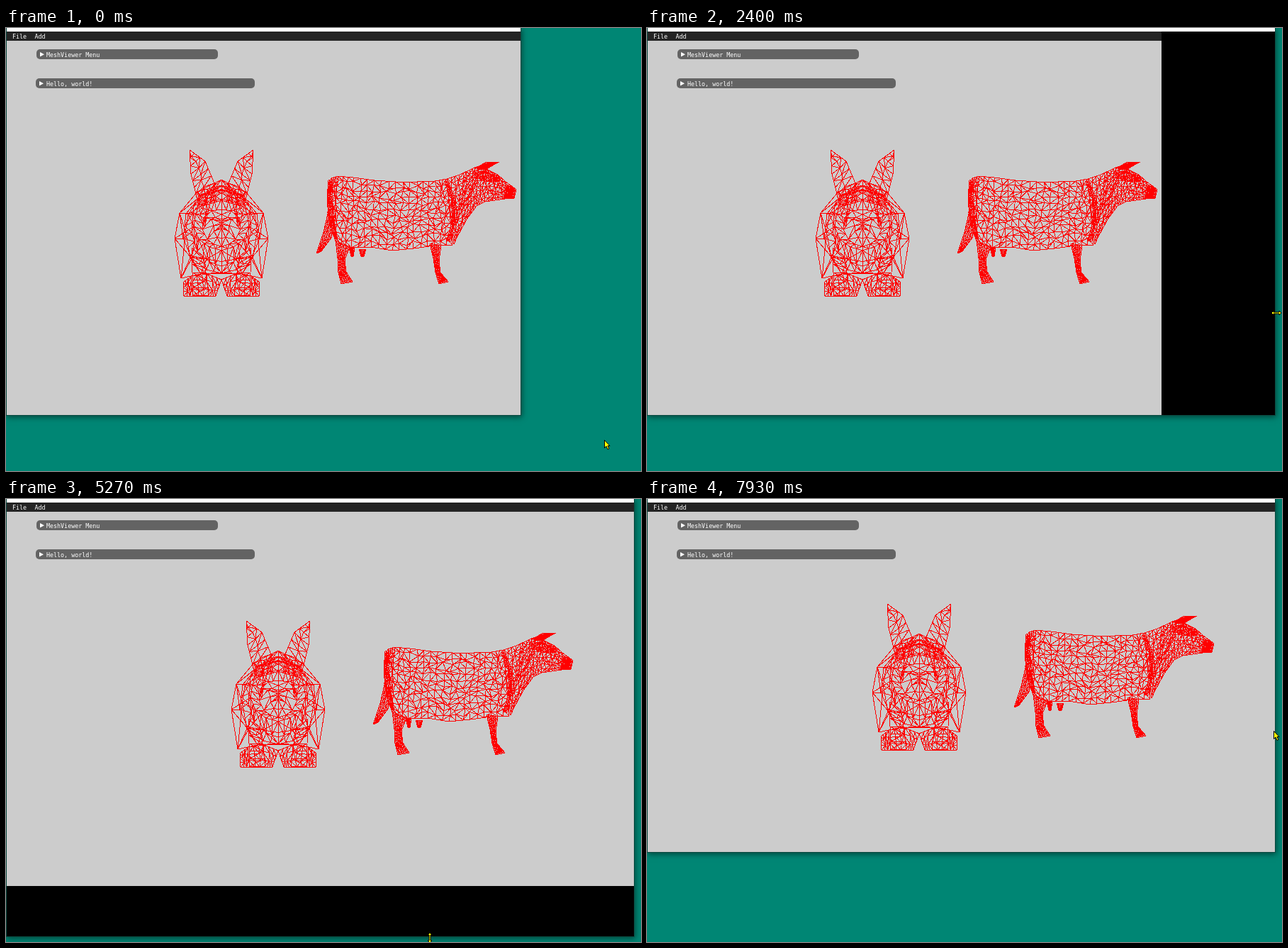
These frames come from a looping animation (896x625 px, 8 s). An HTML page:

```html
<!DOCTYPE html>
<html lang="en">
<head>
<meta charset="utf-8">
<title>Mesh viewer resize</title>
<style>
  html, body { margin: 0; width: 100%; height: 100%; overflow: hidden; background: #008674; }
  body { position: relative; }
  div, svg { position: absolute; }
  #win { left: 1px; top: 0; background: #000; box-shadow: 0 0 0 1px #0b4a41, 1px 2px 8px 1px rgba(0,0,0,.5); overflow: hidden; }
  #title { left: 0; top: 0; width: 100%; height: 5px; background: #fff; }
  #view { left: 0; top: 5px; background: #ccc; overflow: hidden; }
  #menu { left: 0; top: 0; width: 100%; height: 13px; background: #242424; }
  svg { left: 0; top: 0; width: 896px; height: 625px; }
  text { font: 8.35px "DejaVu Sans Mono", monospace; fill: #fff; }
  .panel { fill: #636363; }
  #mesh { fill: none; stroke: #f00; stroke-width: 1; shape-rendering: crispEdges; }
  #cursor path { fill: #ff0; stroke: #000; stroke-width: 1; }
</style>
</head>
<body>
<div id="win">
  <div id="title"></div>
  <div id="view">
    <div id="menu"></div>
    <svg viewBox="1 5 896 625">
      <path id="mesh"/>
      <rect class="panel" x="43" y="30" width="256" height="14" rx="5"/>
      <rect class="panel" x="42" y="71" width="309" height="14" rx="5"/>
      <path d="M48 34L54 37.2L48 40.5ZM47 75L53 78.2L47 81.500Z" fill="#fff"/>
      <text x="9" y="15">File</text>
      <text x="40.500" y="15">Add</text>
      <text x="57" y="40.500">MeshViewer Menu</text>
      <text x="57" y="81.500">Hello, world!</text>
    </svg>
  </div>
</div>
<svg viewBox="0 0 896 625"><g id="cursor"><path/></g></svg>

<script>
const $ = id => document.getElementById(id);
const mix = (a, b, u) => a + (b - a) * u;

let seed = 7;
const random = () => (seed = seed * 16807 % 2147483647) / 2147483647;

// ---- wireframes: each patch is a grid stretched between two polylines ----
const parse = s => s.split('|').map(p => p.trim().split(' ').map(Number));

function along(line, u) {
  const k = u * (line.length - 1), i = Math.min(Math.floor(k), line.length - 2);
  return [0, 1].map(c => mix(line[i][c], line[i + 1][c], k - i));
}

let path = '';
function patch(from, to, cols, rows, { wobble = 0, mirror = false } = {}) {
  const a = parse(from), b = parse(to), grid = [];
  for (let i = 0; i <= cols; i++) {
    const p = along(a, i / cols), q = along(b, i / cols);
    grid.push(Array.from({ length: rows + 1 }, (_, j) => {
      const inner = i && j && i < cols && j < rows ? wobble : 0;
      return [0, 1].map(c => mix(p[c], q[c], j / rows) + (random() - .5) * inner);
    }));
  }
  const line = (p, q) => {
    const add = f => path += `M${f(p[0])} ${p[1].toFixed(1)}L${f(q[0])} ${q[1].toFixed(1)}`;
    add(x => x.toFixed(1));
    if (mirror) add(x => (608 - x).toFixed(1));
  };
  for (let i = 0; i <= cols; i++) for (let j = 0; j <= rows; j++) {
    if (i < cols) line(grid[i][j], grid[i + 1][j]);
    if (j < rows) line(grid[i][j], grid[i][j + 1]);
    if (i < cols && j < rows) {
      if (random() < .5) line(grid[i][j], grid[i + 1][j + 1]);
      else line(grid[i + 1][j], grid[i][j + 1]);
    }
  }
}

function bunny() {
  const half = { mirror: true, wobble: 5 };
  const rings = [
    '304 214|270 231|245 261|238 297|247 353|275 347|304 345',
    '304 222|274 238|254 262|250 297|262 325|283 341|304 346',
    '304 228|280 238|264 260|262 288|270 315|287 330|304 336',
    '304 241|284 246|268 262|265 280|272 298|287 309|304 314',
    '304 256|290 258|279 268|277 284|284 298|293 305|304 308'
  ];
  for (let i = 0; i < 4; i++) patch(rings[i], rings[i + 1], i ? 12 : 6, 1, half);
  patch(rings[4], '304 270|304 285', 6, 2, half);
  patch(rings[0], rings[3], 6, 2, half);
  patch('304 214|270 231', '304 243|274 252', 4, 3, half);
  patch('259 172|261 206|268 234|278 278', '259 172|281 188|294 219|281 278', 9, 2, half);
  patch('262 310|263 345|264 377', '278 325|282 345|286 377', 6, 1, half);
  patch('250 359|262 350|284 347|304 355', '251 378|264 378|285 378|296 378', 9, 3, half);
}

function cow() {
  // body, neck, head
  patch('454 224|459 212|468 209|490 211|520 215|550 217|580 217|605 216|622 213',
        '455 262|459 285|466 303|487 310|515 309|545 314|575 311|605 307|630 306', 24, 12, { wobble: 6 });
  patch('622 213|640 207|655 200|666 195', '632 305|637 294|650 270|664 251', 9, 12, { wobble: 3 });
  patch('666 195|680 200|694 207|704 216|720 228', '664 251|676 245|690 243|704 241|717 240', 12, 8, { wobble: 3 });
  // horn, ear, muzzle
  patch('664 197|676 190|696 189', '668 200|680 198|690 192', 10, 4);
  patch('662 205|680 200|696 210', '664 212|682 216|697 216', 10, 4, { wobble: 2 });
  patch('706 221|720 229', '702 240|716 241', 5, 7, { wobble: 1 });
  // shoulder, rump, tail
  patch('618 216|628 240|630 270|622 300', '624 216|633 240|634 270|628 300', 18, 2);
  patch('455 215|453 240|457 270|460 290', '461 213|460 240|463 270|468 300', 18, 2);
  patch('454 262|448 288|438 318', '463 270|459 296|445 315', 12, 4);
  // legs and udder
  patch('465 300|468 325|469 345|473 361', '485 309|478 327|480 344|489 358', 15, 5);
  patch('598 304|603 325|606 345|611 361', '614 307|611 328|613 345|624 358', 15, 5);
  patch('484 310|487 322', '492 311|490 322', 5, 4);
  patch('498 312|501 322', '508 312|505 322', 5, 4);
}

bunny();
cow();
$('mesh').setAttribute('d', path);

// ---- motion, in ticks of 1/15 s ----
const TICKS = 120, TICK = 8000 / TICKS;

// tick, right edge, bottom edge
const windowTrack = [
  [20, 726, 546], [21, 732, 546], [23, 779, 546], [24, 779, 546], [26, 815, 546],
  [27, 815, 546], [36, 886, 546], [65, 886, 546], [69, 886, 588], [71, 886, 628],
  [77, 886, 628], [79, 886, 617], [98, 886, 617], [104, 886, 498]
];
// tick, x, y
const cursorTrack = [
  [0, 844, 581], [13, 733, 399], [14, 733, 399], [15, 732, 394], [16, 728, 400], [18, 728, 401],
  [20, 728, 401], [23, 799, 401], [24, 799, 401], [26, 839, 401], [27, 839, 401], [36, 888, 402],
  [43, 888, 402], [53, 572, 532], [54, 572, 532], [55, 573, 535], [57, 573, 535], [59, 580, 552],
  [61, 581, 547], [65, 581, 547], [69, 587, 610], [71, 594, 632], [77, 594, 632], [79, 598, 619],
  [98, 598, 619], [104, 600, 500], [109, 600, 500], [119, 884, 327]
];

function at(track, tick) {
  const i = track.findIndex(k => k[0] > tick);
  if (i === 0) return track[0].slice(1);
  if (i < 0) return track[track.length - 1].slice(1);
  const a = track[i - 1], b = track[i], u = (tick - a[0]) / (b[0] - a[0]);
  return [1, 2].map(c => Math.round(mix(a[c], b[c], u)));
}

const ARROW = 'M.5 .5V11.500L3 9L5 13.500L7 12.500L5 8.500H8Z';
const RESIZE = 'M-7 0L-4 -3V-1H4V-3L7 0L4 3V1H-4V3Z';
const pointer = document.querySelector('#cursor path');

function draw(now) {
  const tick = Math.floor((now % 8000 + 5) / TICK) % TICKS;

  const [right, bottom] = at(windowTrack, tick);
  $('win').style.width = right - 1 + 'px';
  $('win').style.height = bottom + 'px';

  // the viewport repaints only after the drag is released
  const viewRight = tick < 44 ? 726 : 886, viewBottom = tick < 91 ? 546 : 617;
  $('view').style.width = viewRight - 1 + 'px';
  $('view').style.height = viewBottom - 5 + 'px';
  const dx = tick < 44 ? 0 : 80, dy = tick < 91 ? 0 : tick < 110 ? 36 : -24;
  $('mesh').setAttribute('transform', `translate(${dx} ${dy})`);

  const [x, y] = at(cursorTrack, tick);
  const sideways = tick >= 16 && tick < 44, upright = tick >= 59 && tick < 110;
  pointer.setAttribute('d', sideways || upright ? RESIZE : ARROW);
  $('cursor').setAttribute('transform', `translate(${x} ${y}) rotate(${upright ? 90 : 0})`);
}

const start = performance.now();
(function loop() {
  draw(performance.now() - start);
  requestAnimationFrame(loop);
})();
</script>
</body>
</html>
```
